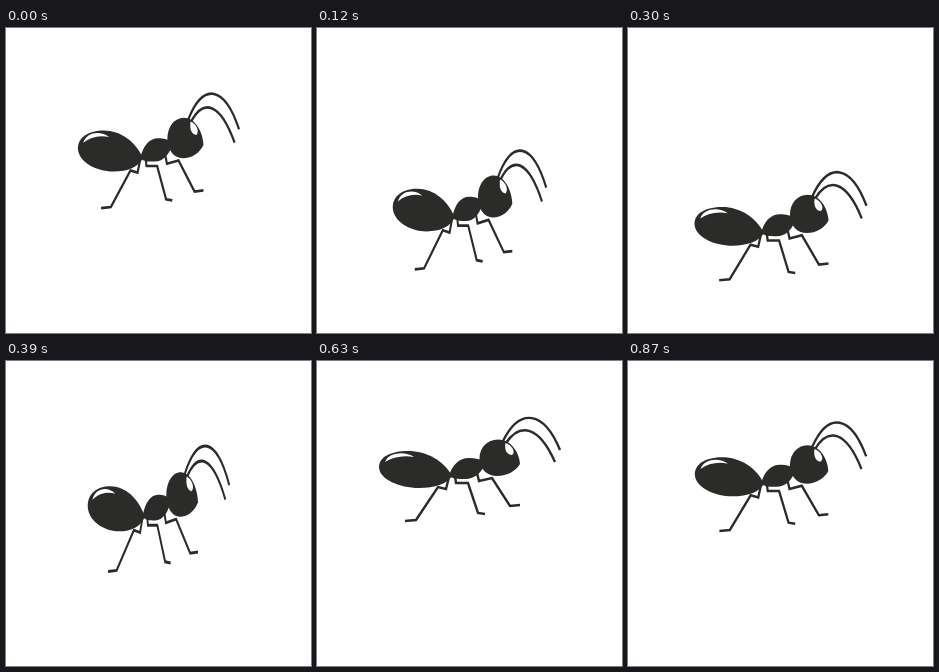
Recreate the animation shown at these times as an HTML page. Size 305 px wide and 305 px high, loop 900 ms.

```html
<!DOCTYPE html>
<html lang="en">
<head>
<meta charset="utf-8">
<title>Hopping ant</title>
<style>
  html, body { margin: 0; width: 100%; height: 100%; overflow: hidden; background: #fff; }
  svg { display: block; width: 100%; height: 100%; }
  .body { fill: #2b2b29; }
  .line { fill: none; stroke: #2b2b29; stroke-width: 2.4; }
  .shine { fill: #fff; }
</style>
</head>
<body>
<svg viewBox="0 0 305 305">
  <g id="ant">
    <g class="line">
      <path d="M132 116L129 128L121 126L99 159L88 160"/>
      <path d="M138 115L139 122L151 122L161 152L168 153"/>
      <path d="M160 112L162 120L175 117L193 145L203 144"/>
      <path d="M186 80C203 46 227 50 243 89"/>
      <path d="M189 82C203 61 222 65 238 101"/>
    </g>
    <g class="body">
      <path d="M135 115C127 100 110 90 91 90C74 90 62 96 62 106C62 118 82 127 102 127C118 127 130 123 135 115Z"/>
      <path d="M132 115C135 104 142 97 152 97C158 97 164 98 168 101C166 111 158 118 148 118C141 118 136 118 132 115Z"/>
      <path d="M181 78.500C170 78.500 162.500 87 162.500 97C162.500 108 170 115 180 115C190 115 199 110 203 103C202 90 193 78.500 181 78.500Z"/>
    </g>
    <g class="shine">
      <path d="M68 101C72 91 88 90 97 96C86 94 76 96 68 101Z"/>
      <path d="M188.500 82C195 84 199 91 195 94C190 94 187 89 188.500 82Z"/>
    </g>
  </g>
</svg>
<script>
  const LOOP = 900, HALF = LOOP / 2, STEP = 30;
  const LANDING = 225;              // moment of the lowest pose
  const CENTER = { x: 152.5, y: 108 };
  const DROP = 110;                 // height of the hop
  const PEAK = 150;                 // time between landing and longest stretch
  const STRETCH = 0.224, SQUASH = 0.125;

  // Falls smoothly from 1 to 0 while u goes from 0 to 1
  const fade = (u, power) => Math.cos(u * Math.PI / 2) ** (2 * power);

  // s is the time from the nearest landing
  const stretch = s => s < PEAK
    ? STRETCH - (STRETCH + SQUASH) * fade(s / PEAK, 1)
    : STRETCH * fade((s - PEAK) / (HALF - PEAK), 4.5);

  const ant = document.getElementById("ant");

  function draw(ms) {
    const t = Math.floor((ms % LOOP) / STEP) * STEP;
    const gap = Math.abs(t - LANDING);
    const s = Math.min(gap, LOOP - gap);
    const k = stretch(s);
    const y = CENTER.y + DROP * fade(s / HALF, 2.93);
    ant.setAttribute("transform",
      `translate(${CENTER.x} ${y}) scale(${1 - k} ${1 + k}) translate(${-CENTER.x} ${-CENTER.y})`);
  }

  const start = performance.now();
  function tick() {
    draw(performance.now() - start);
    requestAnimationFrame(tick);
  }
  draw(0);
  requestAnimationFrame(tick);
</script>
</body>
</html>
```
